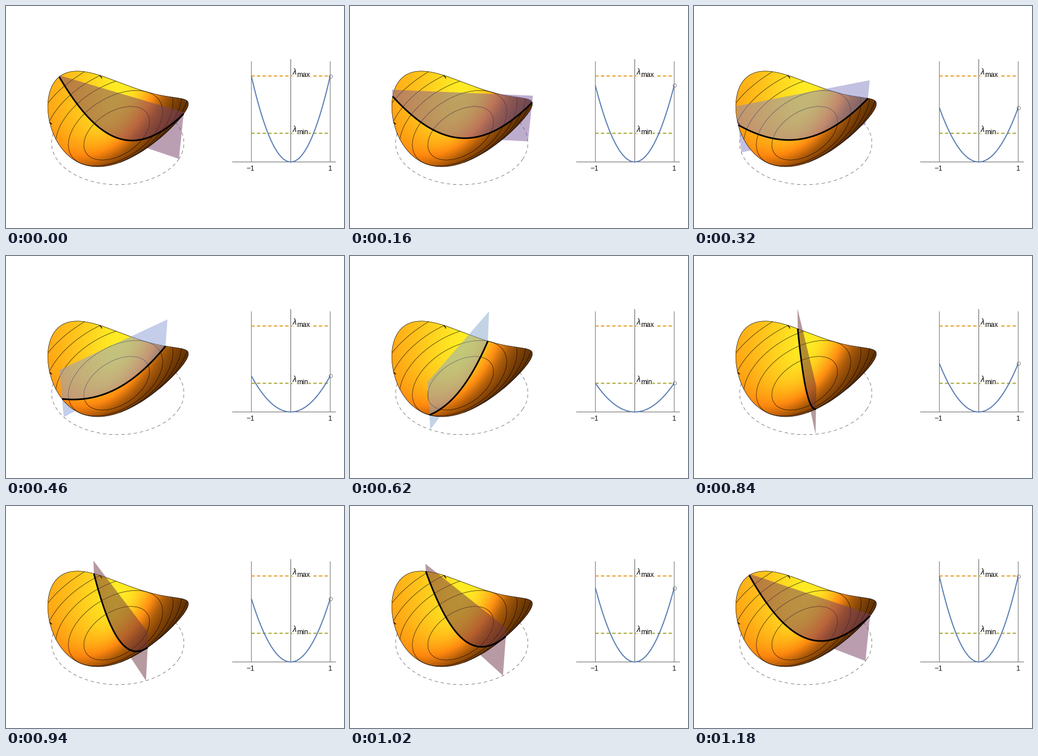
These frames come from a looping animation (600x395 px, 1.2 s). A matplotlib script:

```python
import numpy as np
import matplotlib.pyplot as plt
from matplotlib.animation import FuncAnimation
from matplotlib.patches import Polygon, Rectangle

W, H, DPI = 600, 395, 100
FRAMES, INTERVAL = 60, 20
LMAX, LMIN = 3.0, 1.0
PLANE_TOP = 3.1

# Perspective camera around the centre of a 1 x 1 x 0.4 box
CAM = np.array([1.3, -2.4, 2.0])
BACK = CAM / np.linalg.norm(CAM)
RIGHT = np.array([2.4, 1.3, 0]) / np.hypot(2.4, 1.3)
UP = np.cross(BACK, RIGHT)
FOCAL, CX, CY = 817.5, 198.4, 197.4

# Screen-space light directions
LIGHTS = np.array([[1, 0, 1], [1, 1, 1], [0, 1, 1], [0, 0, 1]], float)
LIGHTS /= np.linalg.norm(LIGHTS, axis=1)[:, None]


def px(n):
    """Pixels to points."""
    return n * 72 / DPI


def form(x, y):
    return LMAX * x**2 + LMIN * y**2


def project(x, y, z):
    """World coordinates to stage pixels, as an (n, 2) array."""
    x, y, z = np.broadcast_arrays(x, y, z)
    p = np.stack([x / 2, y / 2, 0.4 * z / LMAX - 0.2], axis=-1) - CAM
    depth = -p @ BACK
    return np.stack([CX + FOCAL * (p @ RIGHT) / depth,
                     CY - FOCAL * (p @ UP) / depth], axis=-1)


def shade_surface(x0, x1, y0, y1):
    """Cast a ray per pixel onto the paraboloid and light the hit point."""
    gx, gy = np.meshgrid(np.arange(x0, x1) + 0.5, np.arange(y0, y1) + 0.5)
    d = ((gx - CX)[..., None] / FOCAL * RIGHT
         + (CY - gy)[..., None] / FOCAL * UP - BACK)
    k = np.array([1.6 * LMAX / 3, 1.6 * LMIN / 3, 0])
    a = (k * d * d).sum(-1)
    b = (2 * k * CAM * d).sum(-1) - d[..., 2]
    c = (k * CAM * CAM).sum() - CAM[2] - 0.2
    s = (-b + np.sqrt(np.maximum(b * b - 4 * a * c, 0))) / (2 * a)
    p = CAM + s[..., None] * d

    n = np.stack([-2 * k[0] * p[..., 0], -2 * k[1] * p[..., 1],
                  np.ones_like(s)], axis=-1)
    n /= np.linalg.norm(n, axis=-1, keepdims=True)
    n = n @ np.stack([RIGHT, UP, BACK], axis=1)

    base = np.array([0.8807, 0.6110, 0.1421])
    ambient = np.array([0.3010, 0.2241, 0.0905])
    glow = np.array([0.2642, 0.1833, 0.0426])
    rgb = np.ones_like(n) * ambient * base
    for light in LIGHTS[:3]:
        half = light + [0, 0, 1]
        half /= np.linalg.norm(half)
        diffuse = np.maximum(n @ light, 0)
        shine = np.where(diffuse > 0, np.maximum(n @ half, 0)**3, 0)
        rgb += diffuse[..., None] * glow * base + shine[..., None] * glow
    return np.clip(rgb, 0, 1)


def plane_color(theta):
    n = np.array([np.sin(theta), -np.cos(theta), 0])
    n = n if n @ BACK > 0 else -n
    n = np.array([n @ RIGHT, n @ UP, n @ BACK])
    tints = np.array([[0, 0.18, 0.5], [0.18, 0.5, 0.18],
                      [0.5, 0.18, 0], [0, 0, 0.18]])
    return np.clip([0.4, 0.2, 0.2] + np.maximum(LIGHTS @ n, 0) @ tints, 0, 1)


fig = plt.figure(figsize=(W / DPI, H / DPI), dpi=DPI, facecolor="white")
ax = fig.add_axes([0, 0, 1, 1])
ax.axis("off")


def line(xs, ys, width, color="black", z=3, **kw):
    return ax.plot(xs, ys, lw=px(width), color=color, zorder=z,
                   snap=False, **kw)[0]


def dashes(on, off, width):
    return (0, (on / width, off / width))


# Surface, its rim and level curves
turn = np.linspace(0, 2 * np.pi, 721)
cos, sin = np.cos(turn), np.sin(turn)
rim = project(cos, sin, form(cos, sin))
box = (60, 340, 100, 300)
surface = ax.imshow(shade_surface(*box), extent=(box[0], box[1], box[3], box[2]),
                    aspect="auto", interpolation="nearest", zorder=2)
ax.set_xlim(0, W)
ax.set_ylim(H, 0)
surface.set_clip_path(Polygon(rim, closed=True, transform=ax.transData))
line(*rim.T, 0.65)
for level in np.arange(0.5, LMAX, 0.5):
    x, y = np.sqrt(level / LMAX) * cos, np.sqrt(level / LMIN) * sin
    pts = project(x, y, level)
    pts[x**2 + y**2 > 1.0001] = np.nan
    line(*pts.T, 0.6)
line([166.8, 168.6, 170], [123.8, 125.6, 128.2], 1.4)
line([77.8, 79.4, 81], [207.2, 208.8, 210], 1.4)
line(*project(cos, -sin, 0).T, 0.65, "0.25", 0, ls=dashes(6, 5, 0.65),
     dash_capstyle="butt")

# Cutting plane, split by the section curve
lower = ax.add_patch(Polygon(rim[:3], lw=0, alpha=0.5, zorder=1))
upper = ax.add_patch(Polygon(rim[:3], lw=0, alpha=0.5, zorder=4))
section = line([], [], 2.8, z=5, solid_capstyle="butt")

# Section graph
X0, Y0, UNIT_X, UNIT_Y = 505.5, 277.5, 70, 51
for lam, color, name, width in ((LMAX, (0.89, 0.61, 0.14), "max", 37),
                                (LMIN, (0.66, 0.65, 0.19), "min", 29)):
    y = Y0 - UNIT_Y * lam
    line([X0 - UNIT_X, X0 + UNIT_X], [y, y], 2, color, 6,
         ls=dashes(6, 4, 2), dash_capstyle="butt")
    ax.add_patch(Rectangle((508, y - 14), width, 14.6, fc="white", lw=0, zorder=7))
    ax.text(508.8, y - 2, "λ", family="Liberation Sans", style="italic",
            size=px(14), va="baseline", zorder=8)
    ax.text(516, y + 1, name, family="Liberation Sans", size=px(12.3),
            va="baseline", zorder=8)
line([402, 585], [Y0, Y0], 1, "0.4", 5)
line([X0, X0], [95, Y0], 1, "0.35", 5)
for side, label, shift in ((-1, "−1", -1.5), (1, "1", -0.5)):
    x = X0 + side * UNIT_X
    line([x, x], [99, Y0], 1, "0.45", 5)
    ax.text(x + shift, 292.8, label, family="Liberation Sans", size=px(13),
            ha="center", va="baseline", color="0.1", zorder=8)
graph = line([], [], 2, (0.368, 0.507, 0.710), 9, solid_capstyle="butt")
ring = line([], [], 1, z=10, marker="o", ms=px(6), mfc="none", mec="0.4",
            mew=px(0.8))

span = np.linspace(-1, 1, 121)


def draw(i):
    theta = np.pi * i / FRAMES
    x, y = span * np.cos(theta), span * np.sin(theta)
    curve = project(x, y, form(x, y))
    for patch, z in ((lower, 0), (upper, PLANE_TOP)):
        edge = project(x[[-1, 0]], y[[-1, 0]], z)
        patch.set_xy(np.vstack([curve, edge]))
        patch.set_facecolor(plane_color(theta))
    section.set_data(*curve.T)

    value = form(np.cos(theta), np.sin(theta))
    graph.set_data(X0 + UNIT_X * span, Y0 - UNIT_Y * value * span**2)
    ring.set_data([X0 + UNIT_X], [Y0 - UNIT_Y * value])
    return lower, upper, section, graph, ring


anim = FuncAnimation(fig, draw, frames=FRAMES, interval=INTERVAL,
                     repeat=True, repeat_delay=0)
plt.show()
```
